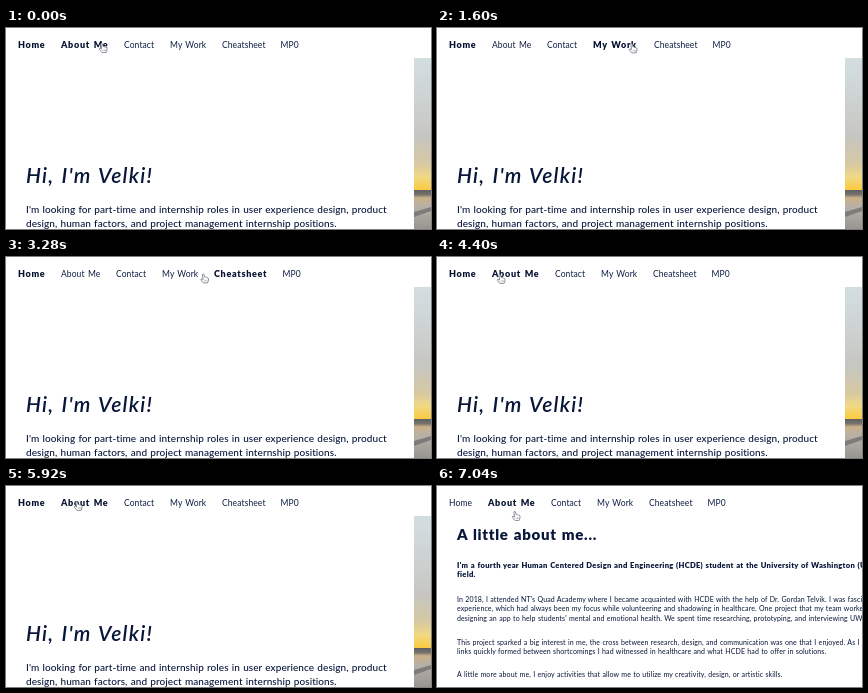
Write an HTML page that moves like this. It is 425x201 px and loops after 7120 ms.

```html
<!DOCTYPE html>
<html lang="en">
<head>
<meta charset="utf-8">
<title>Portfolio navigation</title>
<style>
  html, body { margin: 0; width: 100%; height: 100%; overflow: hidden; background: #fff; }
  svg { display: block; width: 425px; height: 201px; }
  text { font-family: Lato, "Open Sans", sans-serif; fill: #08163a; white-space: pre; }
  .nav text { font-size: 8.5px; letter-spacing: .1px; word-spacing: 1px; fill: #0e1d42; }
  .nav .bold { font-size: 9px; font-weight: 900; letter-spacing: .7px; fill: #061230; }
  .hello { font-size: 21px; font-style: italic; font-weight: 600; letter-spacing: 1.25px; word-spacing: 1px; }
  .intro { font-size: 10px; font-weight: 500; letter-spacing: .07px; word-spacing: .6px; }
  .title { font-size: 15px; font-weight: 900; letter-spacing: .7px; word-spacing: 1px; }
  .lead { font-size: 7.6px; font-weight: 900; letter-spacing: .27px; word-spacing: .5px; }
  .body { font-size: 7px; letter-spacing: .1px; word-spacing: .4px; }
</style>
</head>
<body>
<svg viewBox="0 0 425 201">
  <defs>
    <linearGradient id="sky" x1="0" y1="0" x2="0" y2="1">
      <stop offset="0" stop-color="#d3dee1"/>
      <stop offset=".3" stop-color="#cdd3d3"/>
      <stop offset=".6" stop-color="#c6c6c0"/>
      <stop offset=".8" stop-color="#d6c8a2"/>
      <stop offset=".9" stop-color="#f0d885"/>
      <stop offset="1" stop-color="#fbcb3c"/>
    </linearGradient>
    <linearGradient id="shore" x1="0" y1="0" x2="0" y2="1">
      <stop offset="0" stop-color="#5f6064"/>
      <stop offset=".12" stop-color="#77736c"/>
      <stop offset=".2" stop-color="#cbb088"/>
      <stop offset=".45" stop-color="#b5b0a8"/>
      <stop offset="1" stop-color="#989590"/>
    </linearGradient>
  </defs>

  <g id="home">
    <rect x="408" y="30" width="17" height="132" fill="url(#sky)"/>
    <rect x="408" y="162" width="17" height="39" fill="url(#shore)"/>
    <path d="M408 184L425 179V183L408 189Z" fill="#7d7c7b"/>
    <text class="hello" x="20" y="155">Hi, I'm Velki!</text>
    <text class="intro" x="20" y="185">I'm looking for part-time and internship roles in user experience design, product</text>
    <text class="intro" x="20" y="198.5">design, human factors, and project management internship positions.</text>
  </g>

  <g id="about" visibility="hidden">
    <text class="title" x="20" y="54">A little about me...</text>
    <text class="lead" x="20" y="81.5">I'm a fourth year Human Centered Design and Engineering (HCDE) student at the University of Washington (UW)</text>
    <text class="lead" x="20" y="91">field.</text>
    <text class="body" x="20" y="115.5">In 2018, I attended NT's Quad Academy where I became acquainted with HCDE with the help of Dr. Gordan Telvik. I was fascinated</text>
    <text class="body" x="20" y="125">experience, which had always been my focus while volunteering and shadowing in healthcare. One project that my team worked on</text>
    <text class="body" x="20" y="134.5">designing an app to help students' mental and emotional health. We spent time researching, prototyping, and interviewing UW students</text>
    <text class="body" x="20" y="158.5">This project sparked a big interest in me, the cross between research, design, and communication was one that I enjoyed. As I pursued</text>
    <text class="body" x="20" y="168">links quickly formed between shortcomings I had witnessed in healthcare and what HCDE had to offer in solutions.</text>
    <text class="body" x="20" y="190.5">A little more about me, I enjoy activities that allow me to utilize my creativity, design, or artistic skills.</text>
  </g>

  <g class="nav" id="nav"></g>

  <g id="hand">
    <path d="M-2.1-4.2Q-1.2-5.2-.5-4.1L.1-1.4Q1-2 1.5-1.2Q2.4-1.6 2.8-.7Q3.8-.8 4 .3L3.9 2.2L3.1 4.4H-1.1L-3.6 1.4Q-4 .4-2.9.3L-1.5 1.1Z"
      fill="#fff" stroke="#6f7480" stroke-width=".8" stroke-linejoin="round"/>
    <path d="M.1 1.3V3M1.4 1.3V3M2.6 1.3V3" stroke="#8a8e98" stroke-width=".5"/>
  </g>
</svg>
<script>
const LOOP = 7120, STEP = 80, OPEN_ABOUT = 6000;

// label, left edge when nothing is bold, extra width when bold
const items = [
  ["Home", 12, 4], ["About Me", 51, 8], ["Contact", 106, 6],
  ["My Work", 152, 9], ["Cheatsheet", 204, 10], ["MP0", 262.5, 4]
];

// time, hovered item
const hovers = [
  [0, 1], [480, 2], [1040, 3], [1760, 4], [2320, 5], [3040, 4],
  [3320, 3], [3520, 2], [3840, 1], [4560, 0], [5440, 1]
];

// time, x, y of the pointer
const path = [
  [0, 97, 20], [480, 112, 21], [1040, 152, 21], [1600, 196, 20.5],
  [1760, 209, 21], [2320, 264, 23], [2480, 277, 24], [2800, 280, 24],
  [3040, 258, 23], [3280, 198.5, 21.5], [3520, 149, 21], [3840, 102, 22],
  [4400, 64, 22], [4560, 47, 21], [5040, 28, 20], [5440, 49, 20],
  [5920, 72, 20], [6080, 74, 21], [6320, 79, 30], [LOOP, 79, 30]
];

const byId = id => document.getElementById(id);
const home = byId("home"), about = byId("about"), hand = byId("hand");

const labels = items.map(([name]) => {
  const el = document.createElementNS("http://www.w3.org/2000/svg", "text");
  el.textContent = name;
  el.setAttribute("y", 19.7);
  return byId("nav").appendChild(el);
});

function pointerAt(t) {
  const i = path.findIndex(p => p[0] > t);
  const [t0, x0, y0] = path[i - 1], [t1, x1, y1] = path[i];
  const k = (t - t0) / (t1 - t0);
  return [x0 + (x1 - x0) * k, y0 + (y1 - y0) * k];
}

function drawNav(isBold) {
  let shift = 0;
  items.forEach(([, x, extra], i) => {
    const bold = isBold(i);
    labels[i].setAttribute("x", x + shift);
    labels[i].classList.toggle("bold", bold);
    if (bold) shift += extra;
  });
}

function draw(now) {
  const t = Math.floor(now % LOOP / STEP) * STEP;
  const opened = t >= OPEN_ABOUT;
  const hover = hovers.filter(h => h[0] <= t).pop()[1];
  drawNav(i => i === hover || (i === 0 && !opened));
  home.setAttribute("visibility", opened ? "hidden" : "visible");
  about.setAttribute("visibility", opened ? "visible" : "hidden");
  hand.setAttribute("transform", `translate(${pointerAt(t)})`);
}

const start = performance.now();
function tick() {
  draw(performance.now() - start);
  requestAnimationFrame(tick);
}
tick();
</script>
</body>
</html>
```
